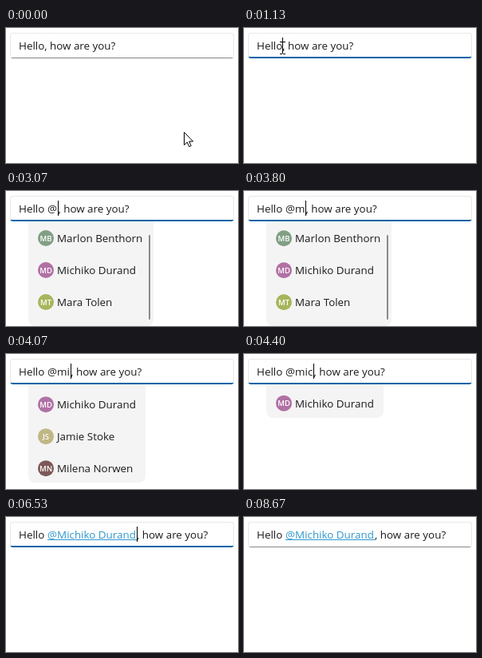
An HTML page with a canvas that plays this animation: 291x169 px, repeating every 8.74 s.

```html
<!DOCTYPE html>
<html lang="en">
<head>
<meta charset="utf-8">
<title>Mention suggestions</title>
<style>
  html, body { margin: 0; width: 100%; height: 100%; overflow: hidden; background: #fff; }
  canvas { display: block; }
</style>
</head>
<body>
<canvas id="stage" width="291" height="169"></canvas>
<script>
const ctx = document.getElementById('stage').getContext('2d');
const LOOP = 8740;
const FONT = '"Open Sans", "Noto Sans", sans-serif';
const INK = '#1b1b1b', LINK = '#2e97cd';

const people = {
  marlon: ['Marlon Benthorn', 'MB', '#809f84'],
  michiko: ['Michiko Durand', 'MD', '#b171a5'],
  mara: ['Mara Tolen', 'MT', '#a6b65c'],
  jamie: ['Jamie Stoke', 'JS', '#bfb785'],
  milena: ['Milena Norwen', 'MN', '#7e5859'],
};
const { marlon, michiko, mara, jamie, milena } = people;

// start time, text after "Hello", caret x
const edits = [
  [0, '', 48.2], [2130, '', 52], [2600, '@', 65.4], [3670, '@m', 77.5],
  [3930, '@mi', 81.2], [4330, '@mic', 87.6], [4530, '@mich', 95.4],
  [5730, '@' + michiko[0], 168], [6530, '@' + michiko[0], 164],
];

// start time, right edge, bottom edge, people, entry offset, entry duration
const lists = [
  [2670, 185, 169, [marlon, michiko, mara], 60, 400],
  [3670, 185, 169, [marlon, michiko, mara], 6, 200],
  [3930, 175, 161, [michiko, jamie, milena], 28, 300],
  [4330, 175, 80, [michiko], 10, 200],
  [4530, 175, 80, [michiko], 3, 270],
  [5730, 0, 0, [], 0, 1],
];

const latest = (rows, t) => rows.filter(row => row[0] <= t).pop();
const clamp = v => Math.max(0, Math.min(1, v));
const easeOut = p => 1 - (1 - clamp(p)) ** 3;
const easeInOut = p => { p = clamp(p); return p * p * (3 - 2 * p); };
const mix = (a, b, p) => a + (b - a) * p;

function text(str, x, y, color = INK, font = '13.4px ' + FONT, align = 'left') {
  ctx.font = font;
  ctx.fillStyle = color;
  ctx.textAlign = align;
  ctx.fillText(str, x, y);
}

function rect(x, y, w, h, color, radius = 0) {
  ctx.fillStyle = color;
  ctx.beginPath();
  ctx.roundRect(x, y, w, h, radius);
  ctx.fill();
}

function drawInput(t, focused) {
  rect(5, 6, 281, 32, '#e8e8e8', 4);
  ctx.save();
  ctx.beginPath();
  ctx.roundRect(5, 6, 281, 32, 4);
  ctx.clip();
  if (focused) rect(5, 36, 281, 2, '#0064a4');
  else rect(5, 37, 281, 1, '#868686');
  ctx.restore();
  rect(6, 7, 279, focused ? 29 : 30, '#fff', 3);

  const [, typed, caret] = latest(edits, t);
  const linked = t >= 5730;
  text('Hello', 16, 27);
  text(typed, 52, 27, linked ? LINK : INK);
  if (linked) rect(52, 28, 112, 1, LINK);
  text(', how are you?', caret, 27);
  if (focused && !(t >= 8000 && t < 8530)) rect(Math.floor(caret), 12, 1, 19, '#000');
}

function drawItem([name, initials, color], y) {
  ctx.fillStyle = color;
  ctx.beginPath();
  ctx.arc(50, y, 10, 0, 7);
  ctx.fill();
  text(initials, 50, y + 3.5, '#fff', '600 9.5px ' + FONT, 'center');
  text(name, 64, y + 5);
}

function drawList(t) {
  const list = latest(lists, t);
  if (!list || !list[3].length) return;
  const [start, right, bottom, items, offset, duration] = list;
  const p = easeOut((t - start) / duration);
  const opening = start === 2670;
  const shift = offset * (1 - p);

  ctx.save();
  ctx.beginPath();
  ctx.rect(0, 38, 291, 131);
  ctx.clip();
  if (opening) {
    ctx.globalAlpha = p;
    ctx.translate(0, -shift);
  }
  rect(28, 38, right - 28, bottom - 38, '#f4f4f4', [3, 3, 8, 8]);
  if (t >= 4800) rect(29, 39, right - 30, bottom - 40, '#eaeaea', 6);
  ctx.beginPath();
  ctx.rect(28, 38, right - 28, bottom - 38);
  ctx.clip();
  items.forEach((person, i) => drawItem(person, 59 + 40 * i + (opening ? 0 : shift)));
  if (right === 185) rect(179, 55, 2, 106, '#8b8b8b', 1);
  ctx.restore();
}

function drawPointer(t) {
  if (t >= 1670) return;
  const go = easeInOut((t - 20) / 780), leave = easeInOut((t - 1480) / 120);
  const x = mix(mix(223, 48, go), 59, leave);
  const y = mix(mix(130, 17, go), 74, leave);
  ctx.save();
  ctx.translate(Math.round(x), Math.round(y));
  if (y < 38) {
    rect(-3, 0, 3, 1, '#000');
    rect(1, 0, 3, 1, '#000');
    rect(0, 1, 1, 14, '#000');
    rect(-3, 15, 3, 1, '#000');
    rect(1, 15, 3, 1, '#000');
  } else {
    const arrow = new Path2D('M.5 .5V16.5L4.2 13L6.8 18.6L9.2 17.5L6.7 12H11.6Z');
    ctx.fillStyle = '#fff';
    ctx.strokeStyle = '#000';
    ctx.lineWidth = 1;
    ctx.fill(arrow);
    ctx.stroke(arrow);
  }
  ctx.restore();
}

function frame(now) {
  const t = now % LOOP;
  ctx.fillStyle = '#fff';
  ctx.fillRect(0, 0, 291, 169);
  drawInput(t, t >= 1130 && t < 8670);
  drawList(t);
  drawPointer(t);
}

const origin = performance.now();
function tick() {
  frame(performance.now() - origin);
  requestAnimationFrame(tick);
}
tick();
</script>
</body>
</html>
```
